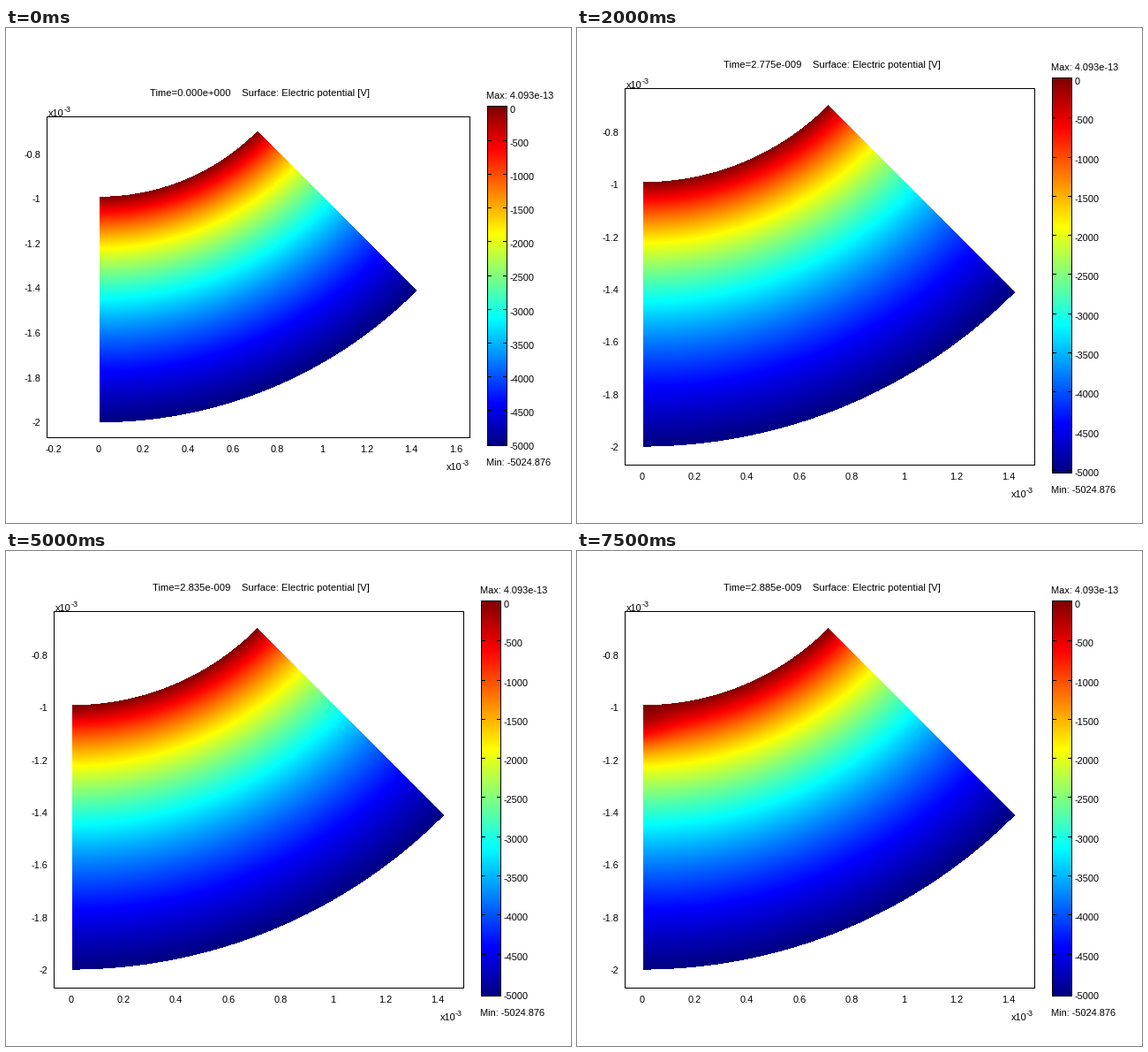
A matplotlib script that plays this animation: 640 px wide and 560 px high, repeating every 8000 ms.

```python
import numpy as np
import matplotlib.pyplot as plt
from matplotlib.animation import FuncAnimation

W, H, DPI = 640, 560, 100
FRAMES, INTERVAL = 16, 500
SWITCH = 4            # step at which the window layout changes
ONSET = 9             # step at which the discharge starts to show
V_MIN = -5024.876
R_OUT = 2.009         # outer radius, the inner one is 1

plt.rcParams["font.family"] = "Liberation Sans"

# origin, px per unit, axes box, colour bar box, title centre, label positions
SMALL = dict(org=(105.7, -62.3), scale=253.1, box=(46, 100, 525, 463),
             bar=(545, 88, 567, 472), title=(287.5, 73), xlab=476, ylab=39.5,
             xticks=np.arange(-1, 9) / 5, lift=2.5, exp=[(48, 96), (499, 496)],
             ends=(76, 491), step=38.1)
LARGE = dict(org=(74.7, -122.3), scale=296.6, box=(54, 68, 518, 494),
             bar=(538, 56, 560, 503), title=(288.5, 41), xlab=507, ylab=47.5,
             xticks=np.arange(0, 8) / 5, lift=3, exp=[(56, 64), (491.5, 527)],
             ends=(44, 522), step=44.3)


def jet(v):
    """Classic rainbow map for v in 0..1."""
    v = np.asarray(v)[..., None]
    return np.clip(1.5 - np.abs(4 * v - np.array([3, 2, 1])), 0, 1)


def outline(img, x0, y0, x1, y1):
    img[y0:y1 + 1, [x0, x1]] = 0
    img[[y0, y1], x0:x1 + 1] = 0


def discharge(x, depth, step):
    """Rise of the potential around the growing channel on the axis."""
    if step < ONSET:
        return 0
    q = (step - ONSET) / (FRAMES - 1 - ONSET)
    size = (18 + 49 * q ** 1.3) / 2.8
    gain = 15.4 * size * (0.5 + 0.5 * np.sqrt(q))
    u = depth / size
    return gain * u * np.exp((1 - u * u) / 2) / (1 + (x / (1.2 * size)) ** 2)


def raster(lay, step):
    img = np.ones((H, W, 3))
    py, px = np.mgrid[:H, :W] + 0.5
    x, y = px - lay["org"][0], py - lay["org"][1]
    r = np.hypot(x, y) / lay["scale"]
    inside = (x >= 0) & (x <= y) & (r >= 1) & (r <= R_OUT)

    x, r = x[inside], r[inside]
    volt = V_MIN * (1 - 1 / r) / (1 - 1 / R_OUT)
    volt = volt + discharge(x, (r - 1) * lay["scale"], step)
    img[inside] = jet(np.clip(1 - volt / V_MIN, 0, 1))

    x0, y0, x1, y1 = lay["bar"]
    img[y0:y1 + 1, x0:x1 + 1] = jet(np.linspace(1, 0, y1 - y0 + 1))[:, None]
    for k in range(1, 11):
        row = round(y0 + 1 + k * lay["step"])
        img[row, x0:x0 + 5] = 0
        img[row, x1 - 4:x1 + 1] = 0
    outline(img, *lay["bar"])
    outline(img, *lay["box"])
    return img


def write(x, y, s, ha="left", size=11):
    """Text whose digits are centred on y."""
    ax.text(x, y + 0.36 * size, s, ha=ha, va="baseline", color="black",
            fontsize=size * 72 / DPI)


def time_text(step):
    if step == 0:
        return "0.000e+000"
    return f"{2.735 + 0.01 * step:.3f}e-009"


def draw(step):
    lay = SMALL if step < SWITCH else LARGE
    ax.clear()
    ax.axis("off")
    ax.imshow(raster(lay, step), extent=(0, W, H, 0), aspect="auto",
              interpolation="nearest")
    ax.set(xlim=(0, W), ylim=(H, 0))

    write(*lay["title"],
          f"Time={time_text(step)}    Surface: Electric potential [V]",
          "center", 11.2)

    ox, oy = lay["org"]
    for v in lay["xticks"]:
        write(ox - 0.8 + lay["scale"] * v, lay["xlab"], f"{v:g}", "center")
    for v in np.arange(4, 11) / 5:
        write(lay["ylab"], oy + lay["lift"] + lay["scale"] * v, f"{-v:g}", "right")
    for x, y in lay["exp"]:
        write(x, y, "x10")
        write(x + 17.5, y - 4, "-3", size=9)

    x0, y0 = lay["bar"][:2]
    for k in range(11):
        write(x0 + 25.5, y0 + 4 + k * lay["step"], str(-500 * k))
    top, bottom = lay["ends"]
    write(x0 - 1, top, "Max: 4.093e-13")
    write(x0 - 1, bottom, "Min: -5024.876")
    return []


fig = plt.figure(figsize=(W / DPI, H / DPI), dpi=DPI, facecolor="white")
ax = fig.add_axes([0, 0, 1, 1])
anim = FuncAnimation(fig, draw, frames=FRAMES, interval=INTERVAL,
                     init_func=lambda: [], repeat=True, repeat_delay=0)
plt.show()
```
